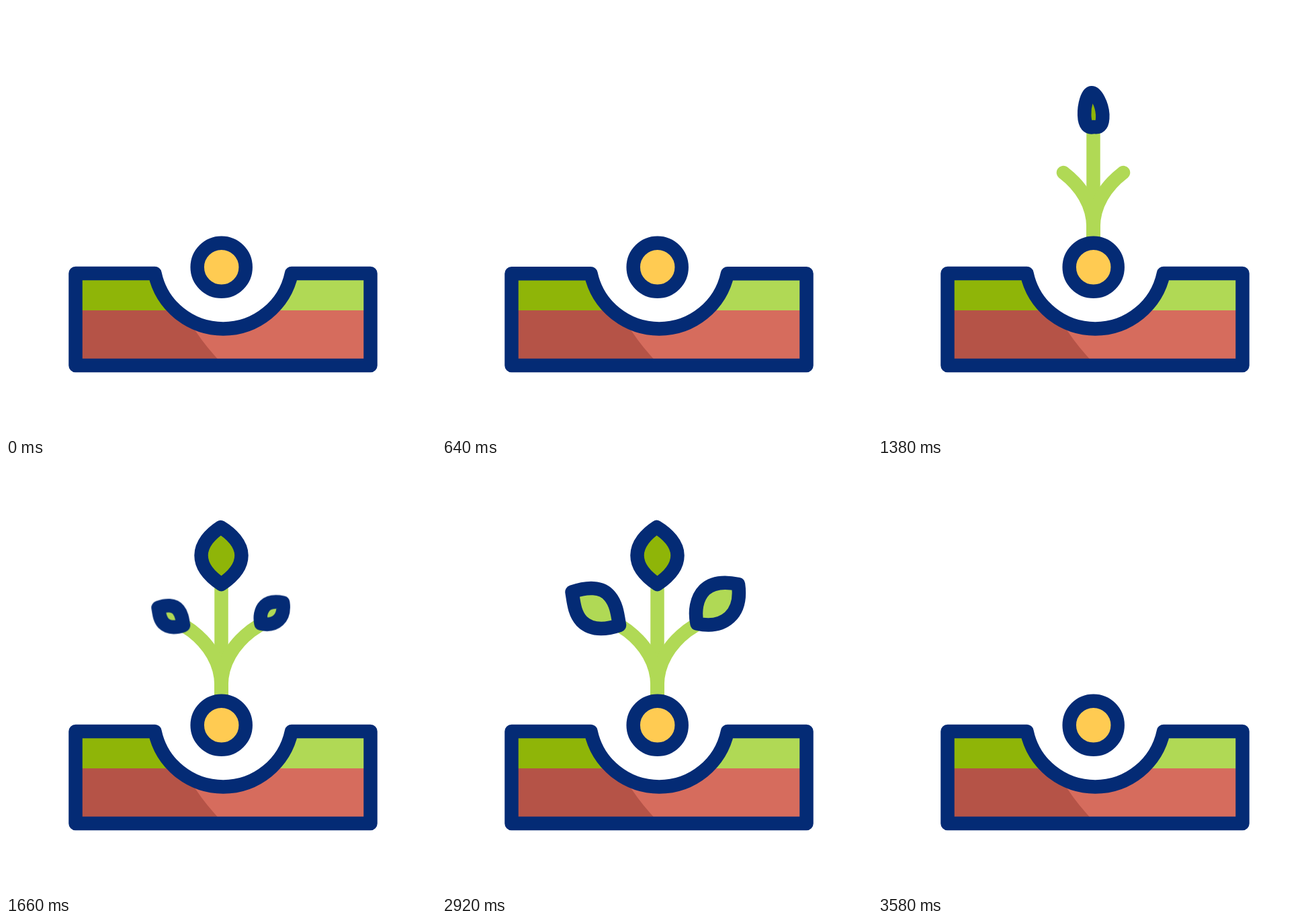
Recreate the animation shown at these times as an HTML page without scripts. Size 640 by 640 pixels, loop 3600 ms.

```html
<!DOCTYPE html>
<html lang="en">
<head>
<meta charset="utf-8">
<title>Sprouting seed</title>
<style>
html, body { margin: 0; width: 100%; height: 100%; overflow: hidden; background: #fff; }
svg { display: block; width: 100vw; height: 100vh; }

.ink { stroke: #042b75; stroke-width: 20.5; stroke-linecap: round; stroke-linejoin: round; }
.stem { fill: none; stroke: #b0d955; stroke-width: 20.5; stroke-linecap: round; stroke-dasharray: 100 200; }
.leaf { vector-effect: non-scaling-stroke; }

.soil, .seed, .stem, .leaf, .leaves { animation: 3.6s linear infinite; }
.soil { animation-name: dip; }
.seed { animation-name: hop; transform-origin: 320.7px 388.7px; }
.main { animation-name: rise; }
.side { animation-name: branch; }
.top { animation-name: bud; }
.left, .right { animation-name: unfold; }
.left { transform-origin: 264px 240px; }
.right { transform-origin: 379.5px 237.5px; }
.leaves { animation-name: fade; }

@keyframes hop {
  0% { transform: none; animation-timing-function: cubic-bezier(.3, 0, .4, 1); }
  5.6% { transform: translateY(-45px); animation-timing-function: cubic-bezier(.6, 0, .7, 1); }
  11.4% { transform: scale(1.01, 1); }
  15%, 100% { transform: none; }
}
@keyframes dip {
  0%, 9.5%, 19%, 100% { d: path("M103.5 398H221.5A104 104 0 0 0 425 398H542.5V535H103.5Z"); animation-timing-function: ease-in-out; }
  12.2% { d: path("M103.5 400H221.5A104.6 104.6 0 0 0 425 400H542.5V534.6H103.5Z"); animation-timing-function: ease-in-out; }
}
@keyframes rise {
  0%, 19% { stroke-dashoffset: 100; visibility: hidden; animation-timing-function: cubic-bezier(.4, 0, .8, .6); }
  26.1% { stroke-dashoffset: 64.2; visibility: visible; }
  30% { stroke-dashoffset: 25.7; animation-timing-function: ease-out; }
  33.5%, 80.8% { stroke-dashoffset: 0; visibility: visible; animation-timing-function: ease-in-out; }
  92%, 100% { stroke-dashoffset: 100; visibility: hidden; }
}
@keyframes branch {
  0%, 29.5% { stroke-dashoffset: 100; visibility: hidden; animation-timing-function: cubic-bezier(.4, 0, .7, .8); }
  38.3% { stroke-dashoffset: 11.5; visibility: visible; animation-timing-function: ease-out; }
  40.5%, 80.8% { stroke-dashoffset: 0; visibility: visible; animation-timing-function: ease-in-out; }
  92%, 100% { stroke-dashoffset: 100; visibility: hidden; }
}
@keyframes bud {
  0%, 32.9% {
    visibility: hidden; stroke-width: 0;
    d: path("M320.5 181C320 181 320 181 320 180C320 180 320 179 320.5 179C321 179 321 180 321 180C321 181 321 181 320.5 181Z");
  }
  33% {
    visibility: visible; stroke-width: 16;
    d: path("M320.5 181C320 181 320 181 320 180C320 180 320 179 320.5 179C321 179 321 180 321 180C321 181 321 181 320.5 181Z");
  }
  38.3% {
    visibility: visible; stroke-width: 20.5;
    d: path("M321 180C313 182 308 178 307.5 163C307 148 312 130 318 130C324 130 333 146 334 162C334.5 176 331 182 321 180Z");
    animation-timing-function: cubic-bezier(.2, .5, .5, 1);
  }
  46.5%, 100% {
    visibility: visible; stroke-width: 20.5;
    d: path("M320.5 179C304 168 290.5 154 290.5 136C290.5 119 304 104 319.5 94C336 104 350.5 119 350.5 136C350.5 154 337 168 320.5 179Z");
  }
}
@keyframes unfold {
  0%, 38.9% { transform: scale(.01); visibility: hidden; animation-timing-function: cubic-bezier(.4, 0, .8, .8); }
  45% { transform: scale(.42); visibility: visible; animation-timing-function: cubic-bezier(.25, .4, .5, 1); }
  55%, 100% { transform: none; visibility: visible; }
}
@keyframes fade {
  0%, 92.5% { opacity: 1; }
  99.4%, 100% { opacity: 0; }
}
</style>
</head>
<body>
<svg viewBox="0 0 640 640">
  <clipPath id="ground">
    <path d="M103.5 398H221.5A104 104 0 0 0 425 398H542.5V535H103.5Z"/>
  </clipPath>
  <g clip-path="url(#ground)">
    <path fill="#8fb508" d="M103 397H320V453H103Z"/>
    <path fill="#b0d955" d="M320 397H543V453H320Z"/>
    <path fill="#d66c5d" d="M103 453H543V536H103Z"/>
    <path fill="#b55347" d="M103 453H264Q274 472 283 485Q298 508 324 535H103Z"/>
  </g>
  <path class="ink soil" fill="none" d="M103.5 398H221.5A104 104 0 0 0 425 398H542.5V535H103.5Z"/>

  <path class="stem main" pathLength="100" d="M320.5 360V181"/>
  <path class="stem side" pathLength="100" d="M320.5 350V330C320.5 296 302 268 276 248L264 240"/>
  <path class="stem side" pathLength="100" d="M320.5 350V330C320.5 296 339 268 365 248L377 240"/>

  <circle class="ink seed" fill="#ffcb52" cx="320.7" cy="388.7" r="36"/>

  <g class="leaves">
    <path class="ink leaf top" fill="#8fb508" d="M320.5 179C304 168 290.5 154 290.5 136C290.5 119 304 104 319.5 94C336 104 350.5 119 350.5 136C350.5 154 337 168 320.5 179Z"/>
    <path class="ink leaf left" fill="#b0d955" d="M193.5 190.5C215 183 238 181.5 250 197C260 209 261.5 225 264 240C243 247 222 248 208 234C197 222 196 206 193.5 190.5Z"/>
    <path class="ink leaf right" fill="#b0d955" d="M441 179C420 174.5 403 176 391 187C378 200 376 220 379.5 237.5C398 241.5 415 240 428 228C441 216 443.5 197 441 179Z"/>
  </g>
</svg>
</body>
</html>
```
